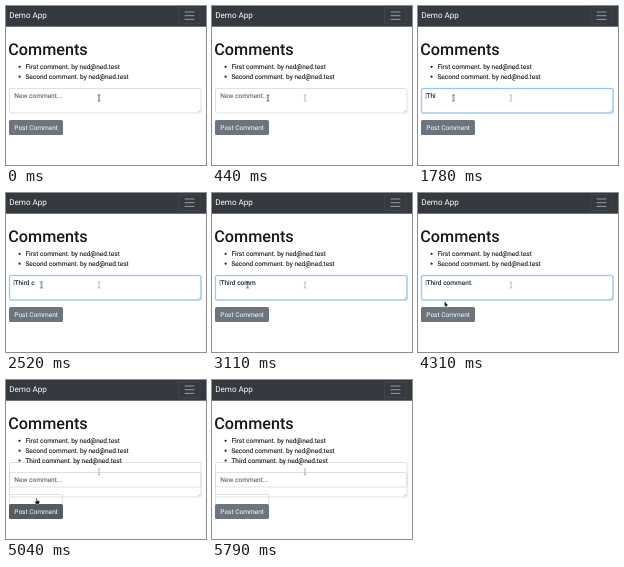
An HTML page that plays this animation: 200x159 px, repeating every 6.93 s.

```html
<!DOCTYPE html>
<html lang="en">
<head>
<meta charset="utf-8">
<title>Comments</title>
<style>
  html, body { margin: 0; width: 100%; height: 100%; overflow: hidden; background: #fff; }
  svg { display: block; width: 100vw; height: 100vh; }
  text { font: 6.55px Roboto, "Liberation Sans", sans-serif; fill: #16191c; stroke: #16191c; stroke-width: .1px; text-rendering: geometricPrecision; }
  .brand { font-size: 8.1px; fill: #fff; stroke: none; }
  .title { font-size: 16.2px; font-weight: 500; stroke: none; }
  .hint { fill: #5a636b; stroke: #5a636b; }
  .label { fill: #fff; stroke: none; }
  .field { fill: #fff; }
  .line { fill: none; stroke: #ced4da; stroke-width: .7px; }

  .pointer, .beam, .arrow, .hand, .rest, .focus, .ask, .before, .after, .form, .button {
    animation: 6930ms step-end -40ms infinite;
  }
  .pointer { animation-name: move; }
  .beam { animation-name: beam; }
  .arrow { animation-name: arrow; }
  .hand { animation-name: hand; }
  .rest { animation-name: rest; }
  .focus { animation-name: focus; }
  .ask { animation-name: ask; }
  .before { animation-name: before; }
  .after { animation-name: after; }
  .form { animation-name: shift; }
  .button { animation-name: hover; }

  @keyframes move {
    0% { transform: translate(93px, 92px); }
    2.165% { transform: translate(86px, 92px); }
    4.329% { transform: translate(72px, 92px); }
    6.494% { transform: translate(56px, 92px); }
    8.514% { transform: translate(43px, 92px); }
    10.678% { transform: translate(37px, 92px); }
    12.843% { transform: translate(35.5px, 92px); }
    60.029% { transform: translate(32px, 100px); }
    62.193% { transform: translate(28px, 111px); }
    64.214% { transform: translate(29px, 117px); }
    66.378% { transform: translate(31px, 121px); }
    79.221% { transform: translate(33px, 133px); }
    81.385% { transform: translate(36px, 149px); }
    83.55%, 100% { transform: translate(38px, 170px); }
  }
  @keyframes beam { 0% { opacity: 1; } 62.193%, 100% { opacity: 0; } }
  @keyframes arrow { 0% { opacity: 0; } 62.193% { opacity: 1; } 64.214% { opacity: 0; } 81.385%, 100% { opacity: 1; } }
  @keyframes hand { 0% { opacity: 0; } 64.214% { opacity: 1; } 81.385%, 100% { opacity: 0; } }
  @keyframes rest { 0% { opacity: 0; } 2.165%, 100% { opacity: .45; } }
  @keyframes focus { 0% { opacity: 0; } 10.678% { opacity: .6; } 12.843% { opacity: 1; } 66.378%, 100% { opacity: 0; } }
  @keyframes ask { 0% { opacity: 1; } 21.356% { opacity: 0; } 70.563%, 100% { opacity: 1; } }
  @keyframes before { 0% { opacity: 0; } 21.356% { opacity: 1; } 70.563%, 100% { opacity: 0; } }
  @keyframes after { 0% { opacity: 0; } 70.563%, 100% { opacity: 1; } }
  @keyframes shift { 0% { transform: none; } 70.563%, 100% { transform: translateY(10px); } }
  @keyframes hover { 0% { fill: #6c757d; } 64.214% { fill: #5a6268; } 66.378% { fill: #545b62; } 81.385%, 100% { fill: #6c757d; } }
</style>
</head>
<body>
<svg viewBox="0 0 200 159" preserveAspectRatio="none">
  <defs>
    <path id="ibeam" d="M-1.3-3.2Q0-3.2 0-2.4V2.4Q0 3.2-1.3 3.2M1.3-3.2Q0-3.2 0-2.4M0 2.4Q0 3.2 1.3 3.2" fill="none" stroke="#222" stroke-width=".7"/>
    <rect id="box" x="3.5" y="82.5" width="191.5" height="24.5" rx="1.6"/>
  </defs>
  <rect width="200" height="159" fill="#fff"/>
  <rect width="200" height="20.7" fill="#343a40"/>
  <text class="brand" x="3.2" y="12.4">Demo App</text>
  <rect x="172.4" y="1.8" width="21.8" height="16" rx="1.6" fill="none" stroke="#fff" stroke-opacity=".1" stroke-width=".6"/>
  <path d="M179 6h9M179 9.7h9M179 13.4h9" stroke="#fff" stroke-opacity=".55" stroke-width=".9" stroke-linecap="round"/>

  <text class="title" x="2.3" y="49.2">Comments</text>
  <g fill="#212529">
    <circle cx="13.6" cy="60.8" r="1.1"/>
    <circle cx="13.6" cy="70.7" r="1.1"/>
    <circle class="after" cx="13.6" cy="80.6" r="1.1"/>
  </g>
  <text x="19.4" y="63">First comment. by ned@ned.test</text>
  <text x="19.4" y="72.9">Second comment. by ned@ned.test</text>

  <g class="form">
    <use class="field line" href="#box" style="fill:#fff"/>
    <g class="focus" fill="none">
      <use href="#box" stroke="#007bff" stroke-opacity=".1" stroke-width="2"/>
      <use href="#box" stroke="#80bdff" stroke-width=".7"/>
    </g>
    <path d="M192 106.2l2.4-2.4M193.4 106.2l1-1" stroke="#888" stroke-width=".4"/>
    <text class="hint ask" x="8.3" y="92.2">New comment...</text>
    <g class="before">
      <path d="M8 86.8v6" stroke="#333" stroke-width=".5"/>
      <text id="typed" x="8.6" y="92.2"></text>
    </g>
    <rect class="button" x="3" y="114" width="54" height="15" rx="1.6"/>
    <text class="label" x="8.3" y="123.9">Post Comment</text>
  </g>

  <g class="after">
    <use class="line" href="#box"/>
    <path class="line" d="M3.5 123.5V116Q3.5 114.4 5 114.4H55.2Q56.7 114.4 56.7 116V123.5"/>
    <text x="19.4" y="82.8">Third comment. by ned@ned.test</text>
  </g>
  <use class="rest" href="#ibeam" x="93" y="92"/>

  <g class="pointer">
    <use class="beam" href="#ibeam"/>
    <path class="arrow" d="M-1.6-2.8V3L-.2 1.8.7 3.8 1.6 3.4.8 1.5H2.5Z" fill="#111" stroke="#fff" stroke-width=".4"/>
    <path class="hand" d="M-.9 3.2L-2.5.8-1.8.2-.9 1V-2.7Q-.4-3.4.1-2.7V-.5L2.3 0Q2.8.3 2.6 1.2L1.9 3.2Z" fill="#111" stroke="#fff" stroke-width=".4"/>
  </g>
</svg>
<script>
  const LOOP = 6930, LEAD = 40, GAP = 148;
  const phrase = "Third comment.";
  const bursts = [[1480, 6], [2520, 2], [2960, 6]];
  const strokes = bursts.flatMap(([start, n]) =>
    Array.from({ length: n }, (_, i) => start + i * GAP));
  const typed = document.getElementById("typed");
  const clock = document.querySelector(".pointer").getAnimations()[0];

  function draw() {
    const t = ((clock.currentTime || 0) + LEAD) % LOOP;
    typed.textContent = phrase.slice(0, strokes.filter(s => s <= t).length);
    requestAnimationFrame(draw);
  }
  draw();
</script>
</body>
</html>
```
